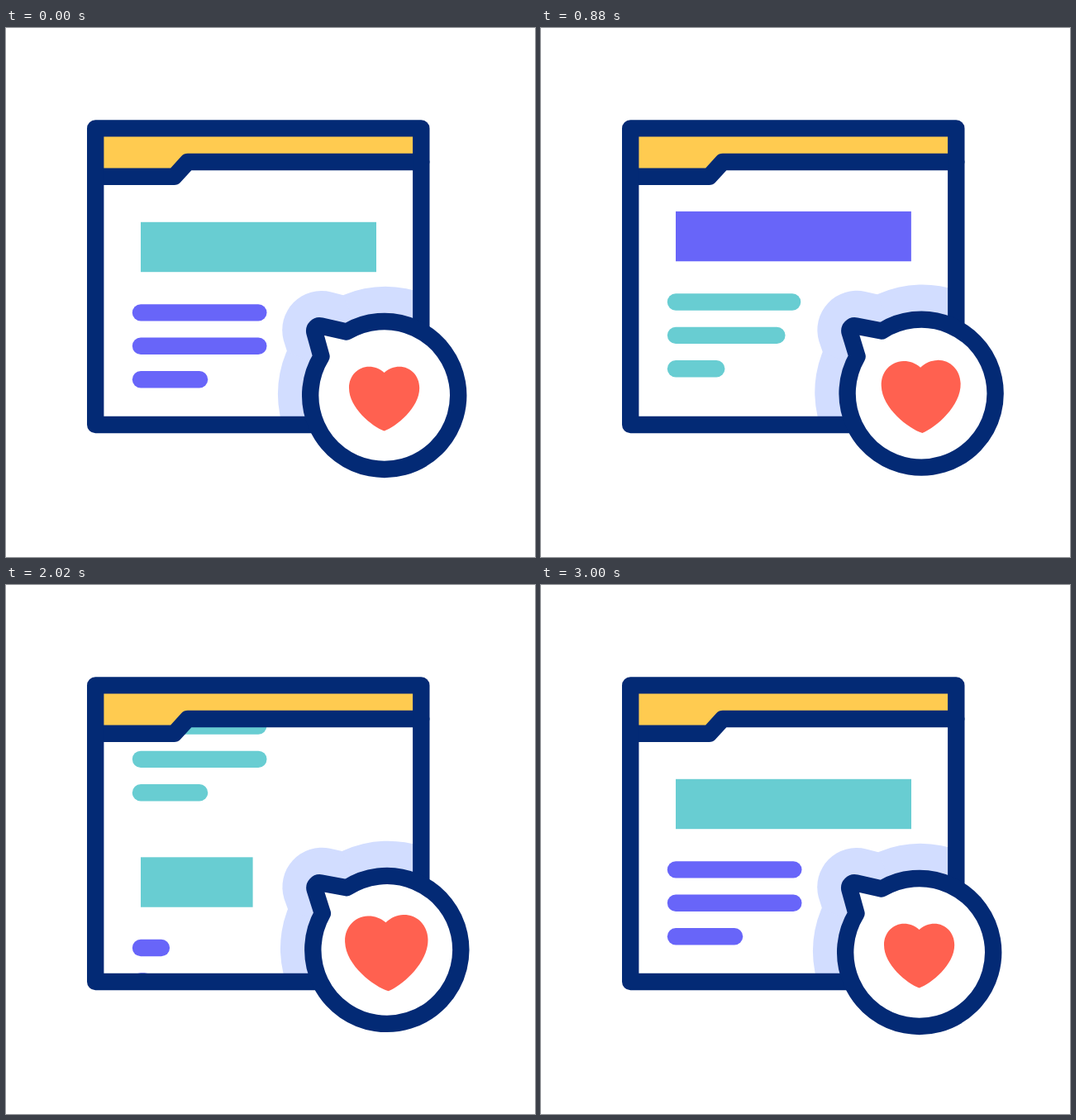
An HTML page that plays this animation: 640x640 px, repeating every 3020 ms.

```html
<!DOCTYPE html>
<html lang="en">
<head>
<meta charset="utf-8">
<title>Favourite page</title>
<style>
  html, body { margin: 0; width: 100%; height: 100%; overflow: hidden; background: #fff; }
  svg { display: block; width: 100%; height: 100%; }
  .line { fill: none; stroke: #032a75; stroke-width: 20.4; stroke-linejoin: round; stroke-linecap: round; }
  .bar { stroke-width: 20.4; stroke-linecap: round; }
  .a rect, .b .bar { fill: #68cdd2; stroke: #68cdd2; }
  .b rect, .a .bar { fill: #6865f9; stroke: #6865f9; }
  .page rect { stroke: none; }
</style>
</head>
<body>
<svg viewBox="0 0 640 640">
  <clipPath id="inside"><rect x="108" y="121" width="394.3" height="359"/></clipPath>
  <g clip-path="url(#inside)">
    <g class="page a"></g>
    <g class="page b"></g>
    <g class="swing" fill="#d2ddff">
      <circle cx="458.9" cy="442.8" r="130"/>
      <path d="M408 323.2 L393.5 319.4 A47.6 47.6 0 0 0 335.8 377.8 L340.2 391.8 L458 442Z"/>
    </g>
    <path fill="#ffcb50" d="M108 121H502.3V162H219.8L203.5 179.8H108Z"/>
  </g>
  <path class="line" d="M108.2 179.8H203.5L219.8 162H502.3"/>
  <rect class="line" x="108.2" y="121.4" width="394.1" height="358.6"/>
  <g class="swing">
    <path class="line" style="fill:#fff" d="M412 367.5 A89.5 89.5 0 1 1 381.5 397.5 L373.4 368.2 A6.3 6.3 0 0 1 381 360.5Z"/>
    <path id="heart" fill="#ff6150" d="M457.6 417 C463 412 469.5 409.7 475.8 409.7 C489.4 409.7 500.2 420.5 500.2 435.5
      C500.2 459.5 472.5 482 457.6 487.5 C442.7 482 415 459.5 415 435.5 C415 420.5 425.8 409.7 439.4 409.7 C445.7 409.7 452.2 412 457.6 417Z"/>
  </g>
</svg>
<script>
const LOOP = 3020, END = 3000, CYCLE = 1500, GAP = 268.5, LEFT = 163;

// Each track is a list of [time, value]
const SWING = [[0, 0], [600, -8], [1200, 6], [1800, -4], [2400, 2], [3000, 0]];
const SCROLL = [[0, 0], [900, 281.8], [1200, GAP]];
const BEAT = [[0, 1], [260, 1.19], [520, 1.09], [780, 1.19], [1040, 1]];
const BANNER = [[230, 31], [890, 285]];
const BARS = [
  { y: 344.4, grow: [[380, 0], [910, 142.3]] },
  { y: 384.8, grow: [[462, 0], [1010, 142.3]] },
  { y: 425.2, grow: [[540, 0], [1080, 71]] }
];

function at(track, t) {
  const i = track.findIndex(k => t < k[0]);
  if (i === 0) return track[0][1];
  if (i < 0) return track[track.length - 1][1];
  const [t0, v0] = track[i - 1], [t1, v1] = track[i];
  const u = (t - t0) / (t1 - t0);
  return v0 + (v1 - v0) * u * u * (3 - 2 * u);
}

function add(parent, tag, attrs) {
  const el = document.createElementNS("http://www.w3.org/2000/svg", tag);
  for (const name in attrs) el.setAttribute(name, attrs[name]);
  return parent.appendChild(el);
}

const pages = [...document.querySelectorAll(".page")].map(g => ({
  g,
  banner: add(g, "rect", { x: LEFT, y: 234.8, height: 60.4 }),
  bars: BARS.map(b => add(g, "line", { class: "bar", x1: LEFT, y1: b.y, y2: b.y }))
}));
const swings = document.querySelectorAll(".swing");
const heart = document.getElementById("heart");

function place(page, y, t) {
  page.g.setAttribute("transform", `translate(0 ${y})`);
  page.banner.setAttribute("width", at(BANNER, t));
  page.bars.forEach((bar, i) => bar.setAttribute("x2", LEFT + at(BARS[i].grow, t)));
}

function draw(time) {
  const t = Math.min(time % LOOP, END);
  const phase = t % CYCLE;
  const current = Math.floor(t / CYCLE) % 2;
  const scroll = at(SCROLL, phase);
  place(pages[current], -scroll, CYCLE);
  place(pages[1 - current], GAP - scroll, phase);

  const angle = at(SWING, t);
  swings.forEach(g => g.setAttribute("transform", `rotate(${angle} 378 360.4)`));
  const size = at(BEAT, t % 1800);
  heart.setAttribute("transform", `translate(457.6 448.5) scale(${size}) translate(-457.6 -448.5)`);
}

const start = performance.now();
function tick() {
  draw(performance.now() - start);
  requestAnimationFrame(tick);
}
tick();
</script>
</body>
</html>
```
